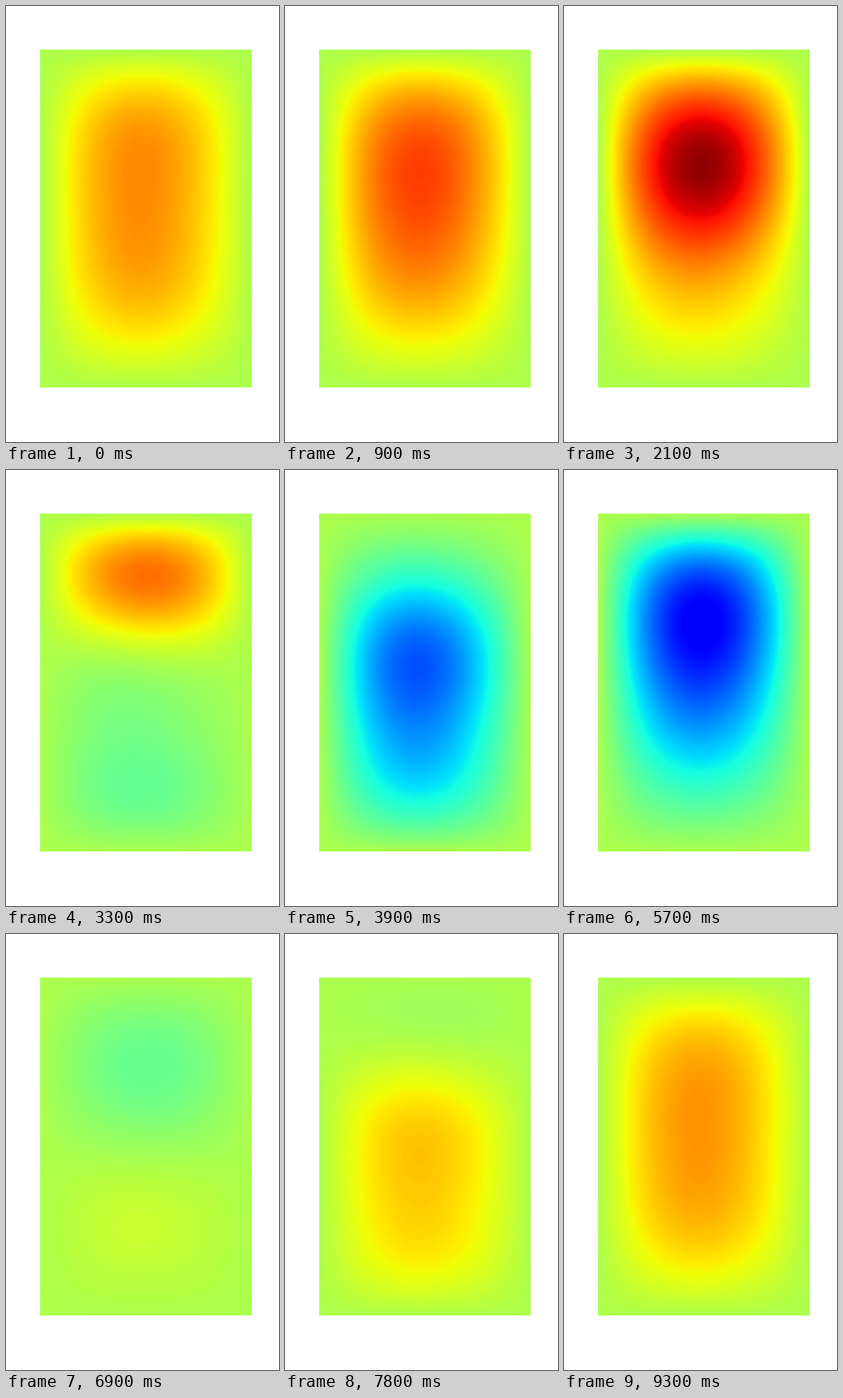
Recreate the animation shown at these times as a matplotlib script. Size 400 by 640 pixels, loop 9.6 s.

```python
import numpy as np
import matplotlib.pyplot as plt
from matplotlib.animation import FuncAnimation

FRAMES, INTERVAL = 32, 300
W, H = 310, 496

# The membrane is driven by four harmonics of one periodic beat
k = np.arange(1, 5)
LEVEL = np.array([0.40, 0.196, 0.057, 0.016])
DECAY = np.array([0.28, 0.33, 0.70, 0.80])
LAG = np.array([0.31, 3.16, -0.55, 2.36])

# Standing modes down the plate: each is weaker and later than the one before,
# and the even ones trail a little more
n = np.arange(1, 5)[:, None]
AMP = LEVEL * DECAY ** (n - 1)
PHASE = LAG + 0.25 * (n - 1) + 0.5 / k**2 * (n % 2 == 0)

TILT, LEAD = 0.035, 1.5

x = (np.arange(W) + 0.5) / W
y = (np.arange(H) + 0.5) / H
down = np.sin(np.pi * n * y)
across = np.sin(np.pi * x)
sway = np.sin(2 * np.pi * x)


def modes(t):
    beat = 2 * np.pi * t / FRAMES
    return (AMP * np.cos(k * beat - PHASE)).sum(axis=1)


def field(t):
    lean = TILT * modes(t + LEAD)[0]
    return np.outer(modes(t) @ down, across) + lean * np.outer(down[0], sway)


fig = plt.figure(figsize=(4, 6.4), dpi=100, facecolor="white")
ax = fig.add_axes([0.125, 0.125, 0.775, 0.775])
ax.axis("off")
image = ax.imshow(field(0), cmap="jet", vmin=-0.558, vmax=0.442,
                  aspect="auto", interpolation="nearest")


def update(i):
    image.set_data(field(i))
    return [image]


anim = FuncAnimation(fig, update, frames=FRAMES, interval=INTERVAL,
                     repeat=True, repeat_delay=0)
plt.show()
```
